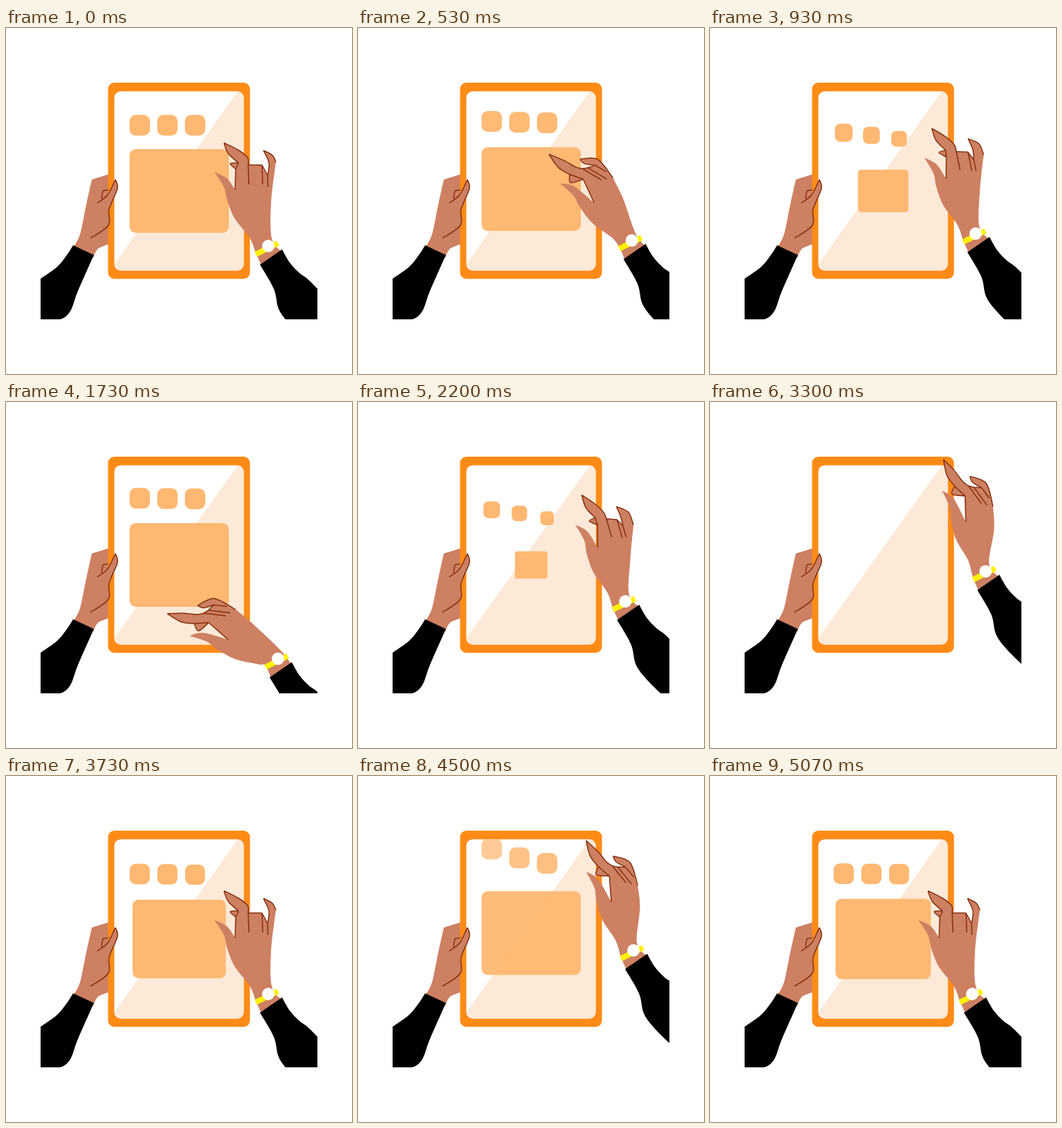
Write an HTML page with a canvas that moves like this. It is 500 px wide and 500 px high and loops after 5110 ms.

```html
<!DOCTYPE html>
<html lang="en">
<head>
<meta charset="utf-8">
<title>Tablet swipe</title>
<style>
html, body { margin: 0; width: 100%; height: 100%; overflow: hidden; background: #fff; }
canvas { display: block; width: 500px; height: 500px; }
</style>
</head>
<body>
<canvas id="stage"></canvas>
<script>
const LOOP = 5110, CYCLE = 1300;
const SKIN = '#cd8062', LINE = '#84300f', ORANGE = '#ff8b17', TILE = '#ffb871', SHINE = '#fde9d7';

const canvas = document.getElementById('stage');
const ctx = canvas.getContext('2d');
const dpr = window.devicePixelRatio || 1;
canvas.width = canvas.height = 500 * dpr;

const clamp = v => Math.max(0, Math.min(1, v));
const mix = (a, b, u) => a + (b - a) * u;
const smooth = u => u * u * (3 - 2 * u);
const points = text => text.split(' ').map(p => p.split(',').map(Number));

// Hand rig, measured from the watch: the arm only slides, the hand turns at the wrist.
const WRIST_IN = points('-10,28 -18,10');
const WRIST_OUT = points('5,-11 19,8');
const PALM = points('-27,-12 -48,-39 -59,-65 -64,-85 -78,-107');
const THUMB = points('-78,-107 -60,-98');
const SIDE = points('4,-62');

// Web, index (base to tip and back), three knuckles, little finger, folded finger, crease direction.
const CURLED = points('-48,-81 -47,-111 -43,-120 -58,-134 -64,-149 -44,-139 -30,-128 -29,-117 -9,-117 -1,-102 1,-120 -7,-138 6,-131 11,-121 -55,-119 1,28');
const POINTING = points('-38,-67 -44,-104 -61,-116 -74,-130 -82,-152 -64,-138 -50,-124 -41,-119 -33,-118 -22,-119 -36,-125 -41,-133 -16,-126 -2,-94 -63,-104 22,23');

// time, watch x, watch y, hand angle, curl
const KEYS = [
  [0, 379, 315, 0, 1],
  [200, 389, 380, -30.5, 0],
  [430, 393, 371, -39.5, 0],
  [630, 398.3, 244.7, 7.7, 0],
  [710, 398.3, 244.7, 7.7, 0],
  [1040, 379, 315, 0, 1],
  [CYCLE, 379, 315, 0, 1]
];

function poseAt(t) {
  const n = KEYS.findIndex(k => k[0] > t);
  const a = KEYS[n - 1], b = KEYS[n];
  const u = smooth((t - a[0]) / (b[0] - a[0]));
  return a.map((v, i) => mix(v, b[i], u));
}

// Smooth curve through the points, continuing the current path.
function curve(p) {
  ctx.lineTo(...p[0]);
  for (let i = 0; i < p.length - 1; i++) {
    const a = p[i - 1] || p[i], b = p[i], c = p[i + 1], d = p[i + 2] || c;
    ctx.bezierCurveTo(
      b[0] + (c[0] - a[0]) / 6, b[1] + (c[1] - a[1]) / 6,
      c[0] - (d[0] - b[0]) / 6, c[1] - (d[1] - b[1]) / 6, c[0], c[1]);
  }
}

function shape(color, parts) {
  ctx.beginPath();
  parts.forEach(curve);
  ctx.closePath();
  ctx.fillStyle = color;
  ctx.fill();
}

function stroke(parts, color = LINE, width = 1.5) {
  ctx.beginPath();
  parts.forEach(p => { ctx.moveTo(...p[0]); curve(p); });
  ctx.strokeStyle = color;
  ctx.lineWidth = width;
  ctx.stroke();
}

function box(x, y, w, h, r, color) {
  ctx.beginPath();
  ctx.roundRect(x, y, w, h, r);
  ctx.fillStyle = color;
  ctx.fill();
}

function leftArm() {
  shape(SKIN, [
    points('98,316 107,298 115,260 124,219'),
    points('124,219 150,211'),
    points('150,312 133,319 126,332')]);
  shape('#000', [
    points('97,314 88,328 74,345 49,363'),
    points('49,422 78,421 93,409 104,380 127,328')]);
}

function leftThumb() {
  const thumb = [
    points('132,253 147,241 158,219'),
    points('158,219 161,232 149,262 148,285 122,304')];
  shape(SKIN, thumb);
  stroke([...thumb, points('148,234 140,235'), points('140,235 138,247')]);
}

function rightArm([, x, y, angle, curl]) {
  const a = angle * Math.PI / 180, c = Math.cos(a), s = Math.sin(a);
  const turn = list => list.map(([px, py]) => [px * c - py * s, px * s + py * c]);
  const fingers = POINTING.map((p, i) => p.map((v, j) => mix(v, CURLED[i][j], curl)));
  const [web, base, joint, under, tip, over, bend, k1, k2, k3,
    inner, smallTip, smallTop, outer, fold, dir] = turn(fingers);
  const palm = turn(PALM), thumb = turn(THUMB), [side] = turn(SIDE);
  const crease = (k, len) => [k, [k[0] + dir[0] * len, k[1] + dir[1] * len]];
  const folded = [joint, fold, base];
  const outline = [
    [web, base], [base, joint], [joint, under, tip], [tip, over, bend, k1],
    [k1, k2], [k2, k3], [k3, inner, smallTip], [smallTip, smallTop, outer]];

  ctx.save();
  ctx.translate(x, y);
  shape(SKIN, [folded]);
  shape(SKIN, [[...WRIST_IN, ...palm], [...thumb, web], ...outline, [outer, side, ...WRIST_OUT]]);
  stroke([...outline, folded, crease(k1, 1), crease(k2, 1), crease(k3, 0.6)]);
  stroke([points('-18,12 14,-4')], '#fff000', 8);
  box(-9, -9, 18, 18, 9, '#fff');
  shape('#000', [
    points('-12,27 20,5'),
    points('20,5 31,24 45,39 56,47 73,64 100,95'),
    points('100,180 54,136 30,112 15,91 8,62 -12,27')]);
  ctx.restore();
}

function tile(x, y, w, h, lift, drop, scale) {
  const alpha = clamp(1 - lift / 136);
  if (scale <= 0 || alpha <= 0) return;
  const cx = x + w / 2, cy = y + h / 2 - lift + drop;
  ctx.globalAlpha = alpha;
  box(cx - w * scale / 2, cy - h * scale / 2, w * scale, h * scale, 9 * scale, TILE);
  ctx.globalAlpha = 1;
}

// Lift of a tile that slides off the top.
function leaving(t) {
  const u = Math.max(0, (t - 380) / 220);
  return 6 * u + 28 * u ** 8;
}

// Tiles pop in late in each cycle and settle during the next one.
function content(t, first) {
  const out = t >= 380 && t < 740;
  const settle = t < 380 ? (first ? Infinity : t + CYCLE) : t;
  const lift = delay => out ? leaving(t - delay) : 0;
  const left = (begin, fall) => out ? 0 : Math.exp((begin - settle) / fall);
  for (let i = 0; i < 3; i++) {
    const r = left(752 + 26 * i, 88);
    tile(178.5 + 40 * i, 125.5, 29.5, 30, lift(15 * i), 83 * r, 1 - r);
  }
  tile(178.5, 175, 143.5, 121, lift(50), 0, 1 - left(863, 96));
}

function tablet(t, first) {
  box(147.5, 79, 205, 283.5, 9, ORANGE);
  box(156.5, 91.5, 187, 259, 9, '#fff');
  ctx.save();
  ctx.clip();
  shape(SHINE, [points('335,91.5 345,91.5'), points('345,352 156,352'), points('156,342 335,91.5')]);
  content(t, first);
  ctx.restore();
}

function draw(now) {
  const time = now % LOOP, t = time % CYCLE;
  ctx.setTransform(dpr, 0, 0, dpr, 0, 0);
  ctx.fillStyle = '#fff';
  ctx.fillRect(0, 0, 500, 500);
  ctx.save();
  ctx.beginPath();
  ctx.rect(50, 50, 400, 371);
  ctx.clip();
  ctx.lineJoin = 'round';
  leftArm();
  tablet(t, time < CYCLE);
  leftThumb();
  rightArm(poseAt(t));
  ctx.restore();
}

const start = performance.now();
function tick() {
  draw(performance.now() - start);
  requestAnimationFrame(tick);
}
tick();
</script>
</body>
</html>
```
